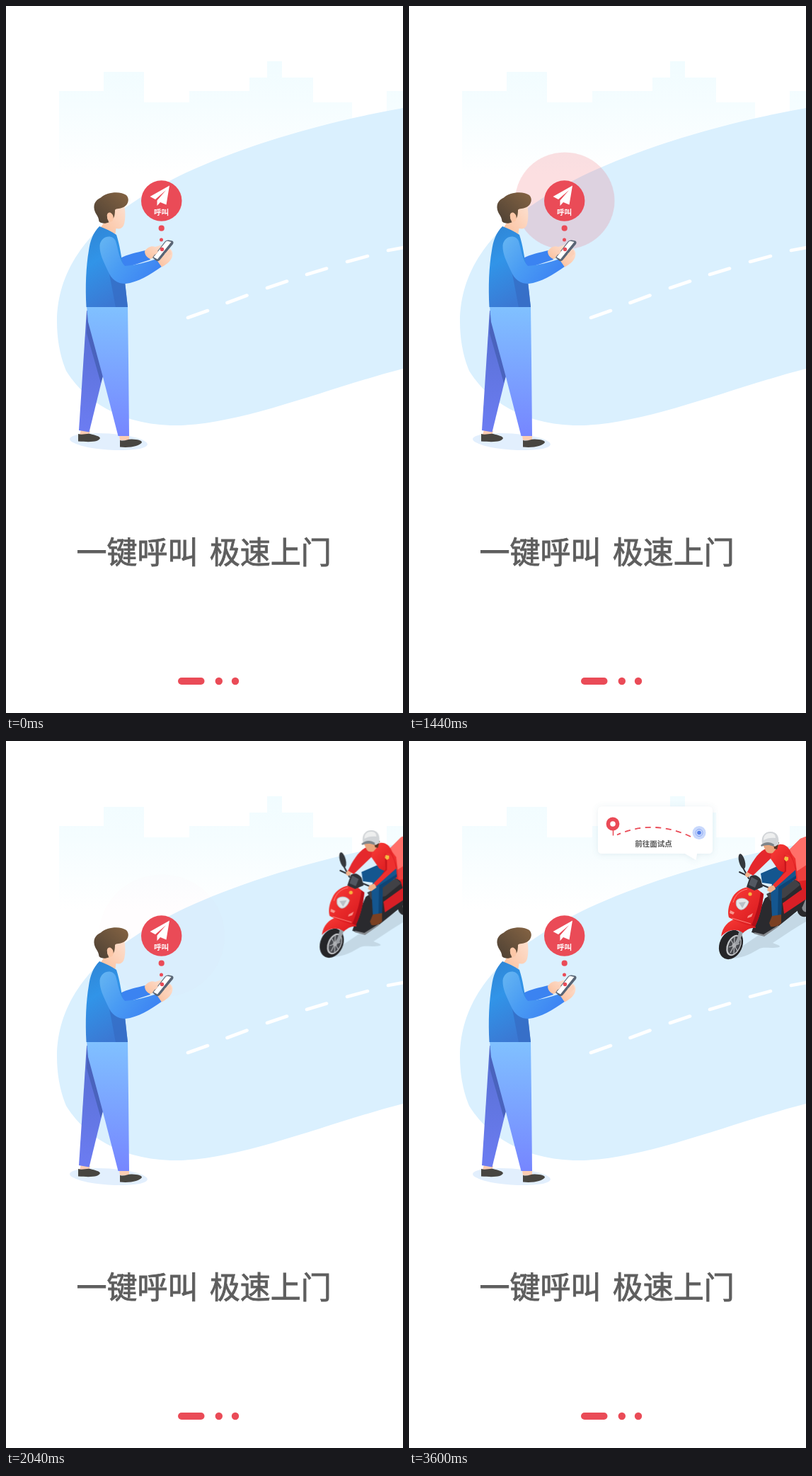
An HTML page for the animation above (3880 ms loop, 561 px wide and 998 px high).

```html
<!DOCTYPE html>
<html lang="zh-CN">
<head>
<meta charset="utf-8">
<title>一键呼叫</title>
<style>
html, body { margin: 0; width: 100%; height: 100%; overflow: hidden; background: #fff; }
svg { display: block; width: 100%; height: 100%; }
text { font-family: "Noto Sans CJK SC", "Noto Sans CJK", sans-serif; text-anchor: middle; }
#caption { font-size: 43px; word-spacing: 6.5px; text-anchor: start; fill: #5e5e5e; stroke: #5e5e5e; stroke-width: .9px; }
.ring, #bike, #tip { animation: 3880ms linear infinite; }
.ring { fill: #ec4b58; opacity: 0; }
#ring1 { animation-name: pulse1; }
#ring2 { animation-name: pulse2; }
#bike { animation-name: ride; }
#tip { animation-name: slide; }

@keyframes pulse1 {
  0% { transform: scale(.28); opacity: .45; }
  14.433% { transform: scale(.7); opacity: .21; }
  19.588% { transform: scale(.83); opacity: .13; }
  27.835%, 100% { transform: scale(.92); opacity: 0; }
}
@keyframes pulse2 {
  0%, 15.9% { transform: scale(.28); opacity: 0; }
  15.979% { transform: scale(.28); opacity: .42; }
  19.588% { transform: scale(.405); opacity: .34; }
  37.113% { transform: scale(.695); opacity: .18; }
  43.299% { transform: scale(.81); opacity: .075; }
  52.577% { transform: scale(.88); opacity: .008; }
  56.701%, 100% { transform: scale(.9); opacity: 0; }
}
@keyframes ride {
  0%, 35.052% { transform: translate(165px, -66px); animation-timing-function: cubic-bezier(.3333, 1, .6667, 1); }
  60.825%, 100% { transform: none; }
}
@keyframes slide {
  0%, 61.856% { transform: translateX(28px); opacity: 0; }
  63.918% { transform: translateX(26.1px); opacity: .12; }
  92.784%, 100% { transform: none; opacity: 1; }
}
</style>
</head>
<body>
<svg viewBox="0 0 561 998">
  <defs>
    <linearGradient id="city" gradientUnits="userSpaceOnUse" x1="0" y1="78" x2="0" y2="238">
      <stop offset="0" stop-color="#f1fcff"/><stop offset=".4" stop-color="#f5fdff"/><stop offset="1" stop-color="#fff"/>
    </linearGradient>
    <linearGradient id="hair" x1="0" y1="1" x2="1" y2="0">
      <stop offset="0" stop-color="#4c4034"/><stop offset="1" stop-color="#866443"/>
    </linearGradient>
    <linearGradient id="skin" x1="0" y1="1" x2="1" y2="0">
      <stop offset="0" stop-color="#fbbf9b"/><stop offset="1" stop-color="#fde0d0"/>
    </linearGradient>
    <linearGradient id="vest" x1=".2" y1="0" x2=".5" y2="1">
      <stop offset="0" stop-color="#2f86d6"/><stop offset=".4" stop-color="#3194e8"/><stop offset="1" stop-color="#3b78d3"/>
    </linearGradient>
    <linearGradient id="sleeve" x1="0" y1="0" x2="1" y2=".6">
      <stop offset="0" stop-color="#66b6f2"/><stop offset=".5" stop-color="#4a9cf3"/><stop offset="1" stop-color="#3d84f3"/>
    </linearGradient>
    <linearGradient id="leg" x1="0" y1="0" x2="0" y2="1">
      <stop offset="0" stop-color="#80c1ff"/><stop offset="1" stop-color="#7686ff"/>
    </linearGradient>
    <linearGradient id="backLeg" x1="0" y1="0" x2="0" y2="1">
      <stop offset="0" stop-color="#566fd0"/><stop offset="1" stop-color="#6c7cf2"/>
    </linearGradient>
    <linearGradient id="red" x1="0" y1="0" x2="1" y2="1">
      <stop offset="0" stop-color="#fb3d38"/><stop offset="1" stop-color="#d5161c"/>
    </linearGradient>
    <filter id="soft" x="-20%" y="-30%" width="140%" height="170%">
      <feDropShadow dx="0" dy="1" stdDeviation="4" flood-color="#5b8096" flood-opacity=".14"/>
    </filter>
  </defs>

  <path fill="url(#city)" d="M75 238V120H138V93H195V136H259V120H344V101H369V78H390V101H434V136H489V238ZM538 238V120H561V238Z"/>
  <path fill="#daf0fe" d="M561 144C430 167 305 208 232 246.500C208 259 190 270 174 281C116 318 72 374 72 446C72 472 77 496 85 515C110 555 160 592 240 592C330 592 452 540 561 512Z"/>
  <path stroke="#fff" stroke-width="4.600" stroke-linecap="round" d="M257 440L285 430M312.500 419L340.500 408.500M369 398L397 388.500M425 379L453 370.500M482 361L511 353M540 345L564 340.500"/>

  <g transform="translate(220.200 275)">
    <ellipse class="ring" id="ring1" rx="101" ry="99"/>
    <ellipse class="ring" id="ring2" rx="101" ry="98.500"/>
  </g>

  <g id="man">
    <ellipse cx="145" cy="615" rx="55" ry="11.500" fill="#e2effd" transform="rotate(4 145 615)"/>
    <path fill="#fbcdb3" d="M106 598L119 600L117 606H104ZM160 606H174V613H161Z"/>
    <path fill="#484641" d="M102 604C108 606 114 603 119 604C126 606 132 607 133 610C131 615 122 616 102 614.500ZM161 613C168 615 172 611 178 611.500C186 612 192 613 192 616C189 621 176 624 161 622.500Z"/>
    <path fill="url(#backLeg)" d="M114 430L103 599L117.500 601.500L137 522L140 430Z"/>
    <path fill="#4a63bd" d="M114.500 436L114 462L134 532L137 522L122 436Z"/>
    <path fill="url(#leg)" d="M114 424H172L173 500L174 607H158.500L136.500 522L116 446Z"/>

    <path fill="#3b83f1" d="M160 357C172 350 185 348 197 345L204 358L164 371Z"/>
    <path fill="url(#skin)" d="M196 346C200 341 205 338 211 340L220 337L216 352L204 357C199 355 196 351 196 346Z"/>

    <path fill="url(#skin)" d="M148 285L167 281C169 290 169 302 166.500 309C164 315 159 315 155.500 314L154 325L133 314L142 300Z"/>
    <path fill="url(#hair)" d="M126 291C122 281 126 274 134 270.500C143 262 162 261 170 267C175 272 173 280 167 283.500C161 287 156 285 154 288C154 294 153 298 152 299C149 303 147 292 144 296C141 301 146 303 146 305C140 308 134 307 131.500 304C131 298 128 295 126 291Z"/>
    <path fill="#fcc7a7" d="M144 300C141 295 144 290 148 292C152 294 153 300 150 304L145 305Z"/>
    <path fill="url(#vest)" d="M132 311C140 314 149 318 156 323C161 338 163 354 166 372L172 425H113.500C112 396 113 368 117 345C119 331 123 320 132 311Z"/>
    <path fill="#356cc4" opacity=".7" d="M145 374C149 392 152 410 155 425H172L168 388Z"/>
    <path fill="url(#sleeve)" d="M132.500 338C134 325 150 321 155 332C159 345 160 359 168 367C183 366 198 362 213 357L220.500 367.500C203 380 186 390 169 392C157 392 149 386 144 374C138 361 132 350 132.500 338Z"/>
    <path fill="url(#skin)" d="M212 357L218 350L229 342C235 343 237 349 234 356C231 362 226 365 220 368.500Z"/>
    <path fill="#596575" d="M207 355L225 332Q227 330 230 330.500L235 331.500Q237.500 333 236 336L217 359Q215 361 212 359.500Z"/>
    <path fill="#fff" d="M208.500 354.500L226 332.500Q227.500 331.500 229 332L233.500 333L214 357.500Z"/>
    <path fill="#fcd0b8" d="M207 347C210 344 214 345 215 347L211 351ZM224 350L232 344L234 350L226 357Z"/>
  </g>

  <g id="call" fill="#ea4b57">
    <circle cx="219.700" cy="275" r="28.700"/>
    <circle cx="219.700" cy="313.700" r="4.100"/>
    <circle cx="219.500" cy="330" r="2.500"/>
    <circle cx="220.500" cy="343.500" r="2.700"/>
    <path fill="#fff" d="M231 253.500L203.500 269L211 273L226 260L213.500 274.500V282L218 277L226.500 280.500Z"/>
    <text x="219.500" y="294.500" font-size="10.500" font-weight="700" fill="#fff">呼叫</text>
  </g>

  <g id="bike">
    <path fill="#bfd3df" opacity=".8" d="M447 306C462 309 477 304 492 295C501 289 509 294 523 291C527 289 518 287 514 285C532 273 548 262 566 252V232L500 270Z"/>
    <ellipse cx="562" cy="230" rx="13" ry="19" fill="#29292c" transform="rotate(22 562 230)"/>
    <ellipse cx="564" cy="229" rx="8" ry="13" fill="#85888d" transform="rotate(22 564 229)"/>
    <path fill="url(#red)" d="M535 156L553 138L566 133V216L545 203Z"/>
    <path fill="#ff6f69" d="M537 154L553 138L566 133V175L548 184L546 166Z"/>
    <path fill="#ee3f3d" d="M548 184L566 172V196L549 198Z"/>
    <path fill="#2a2a2e" d="M490 252L503 222L545 196Q553 198 554 206L561 222L556 234L520 263L501 275L484 270Z"/>
    <path fill="#d81f26" d="M528 229L553 211L566 205V220L530 244Z"/>
    <path fill="#85898e" d="M488 270L501 273L522 260V262L502 276L487 272Z"/>
    <path fill="#414146" d="M505 216L546 196L553 203L531 221L511 226Z"/>

    <ellipse cx="455" cy="287.500" rx="16" ry="21.500" fill="#252528" transform="rotate(25 455 287.500)"/>
    <ellipse cx="459" cy="288.500" rx="9.500" ry="15.500" fill="#c4c6c9" transform="rotate(25 459 288.500)"/>
    <ellipse cx="459.500" cy="288.500" rx="7.800" ry="13.500" fill="#47494e" transform="rotate(25 459.500 288.500)"/>
    <path stroke="#b9bbbf" stroke-width="1.200" d="M454 299L465 278M455 281L464 296M452 291L467 286M460 276L459 301"/>
    <circle cx="459.500" cy="288.500" r="3" fill="#aeb0b4"/>
    <path fill="#9a9ea3" d="M467 266L473 268L465 288L461.500 287Z"/>
    <path fill="url(#red)" d="M441 276C443 262 451 254 462 251L488 258L490 264C481 263 476 268 472 271C462 264 451 266 441 276Z"/>
    <path fill="url(#red)" d="M479 206C468 208 460 214 456 223C451 233 450 242 452 249C463 255 477 261 489 262C495 249 499 235 501 216L492 209Z"/>
    <path fill="#b60f18" d="M497 213L501 216C499 235 495 249 489 262L484 260C490 246 495 230 497 213Z"/>
    <path fill="none" stroke="#ff817a" d="M478 209C468 211 461 217 458 228M456 250L483 258"/>
    <path fill="#e4e7e9" stroke="#b8bbc0" d="M463 225C468 220 477 222 480 227C478 234 473 239 468 238C463 236 461 230 463 225Z"/>
    <path fill="#b9c0c6" d="M466 228L476 227L471 236Z"/>
    <path fill="#f9958d" d="M454 239L460 242L458 245L453 243ZM479 247L486 243L484 248L478 250Z"/>
    <circle cx="482" cy="216" r="2.600" fill="#f7b53c"/>

    <path fill="#303238" d="M477 206L482 191Q490 186 497 195L500 206L488 211Z"/>
    <path fill="#535862" d="M480 203L484 192L493 197L489 207Z"/>
    <path fill="none" stroke="#303238" stroke-width="2" stroke-linecap="round" d="M472 179L480 194M467 185L480 191M496 202L518 211"/>
    <ellipse cx="470.500" cy="170" rx="4.200" ry="11" fill="#34383d" transform="rotate(-15 470.500 170)"/>
    <path fill="#14568f" d="M497 187L520 177L546 180L547 194L527 209L526 247L513 248L511 211L513 202L499 200Z"/>
    <path fill="#0e4474" d="M522 206L547 190V194L527 209L526 247L521 248Z"/>
    <path fill="#7b4022" d="M513 247L526 245L526 257Q521 263 511 262L509 257Z"/>
    <path fill="#f2b28b" d="M478 184L484 187L480 192Q475 193 475 188ZM508 206L516 203L518 209L511 214L506 211Z"/>
    <path fill="#e5282c" d="M502 153L518 148L513 164L486 190L478 185C484 172 492 159 502 153Z"/>
    <path fill="url(#red)" d="M512 157L523 146C531 145 537 150 540 158L547 181C539 187 530 187 522 182L511 166Z"/>
    <path fill="#c8151c" d="M530 160L536 184L520 200L517 203L531 183Z"/>
    <path fill="#ee302f" d="M533 160C539 160 543 167 546 182L537 190L518 207L514 203L533 184Z"/>
    <path fill="#f6bd42" d="M531 163L536 164L536 168L533 170L530 167Z"/>
    <path fill="#e9a57c" d="M500 146L521 143L521 150L514 158Q507 160 504 155Z"/>
    <path fill="#5c3524" d="M515 144L523 143L520 153L516 152Z"/>
    <path fill="#d2d5d8" d="M499 145C497 134 503 128 511 128C519 128 524 134 522 146L517 149C513 145 507 144 499 145Z"/>
    <path fill="#eeefef" d="M501 140C501 133 505 130 511 130C516 130 518 133 518 137C512 136 506 137 501 140Z"/>
    <path fill="#7f858a" d="M497 147C503 142 510 142 516 146L515 149C509 146 503 147 498 149Z"/>
  </g>

  <g id="tip">
    <path filter="url(#soft)" fill="#fff" d="M273 92.500H423Q429 92.500 429 98.500V153Q429 159 423 159H407L405.500 168L390 159H273Q267 159 267 153V98.500Q267 92.500 273 92.500Z"/>
    <path stroke="#ea4b57" stroke-width="1.500" d="M288.500 124V133.500"/>
    <circle cx="288" cy="117" r="6.600" fill="#fff" stroke="#ea4b57" stroke-width="5.600"/>
    <path fill="none" stroke="#ea4b57" stroke-width="1.800" stroke-dasharray="8 6.600" stroke-dashoffset="2.600" d="M294 132.500Q345 110 398 135"/>
    <circle cx="410" cy="129.500" r="9.500" fill="#c8d8fc"/>
    <circle cx="410" cy="129.500" r="5" fill="none" stroke="#8eaaf3"/>
    <circle cx="410" cy="129.500" r="2.800" fill="#5680e8"/>
    <text x="345.500" y="148.500" font-size="10.500" font-weight="700" fill="#555">前往面试点</text>
  </g>

  <text id="caption" x="99.500" y="786.500">一键呼叫 极速上门</text>
  <g fill="#ea4b57">
    <rect x="243" y="948" width="37.500" height="10" rx="5"/>
    <circle cx="300.800" cy="953" r="5.200"/>
    <circle cx="324" cy="953" r="5.200"/>
  </g>
</svg>
</body>
</html>
```
